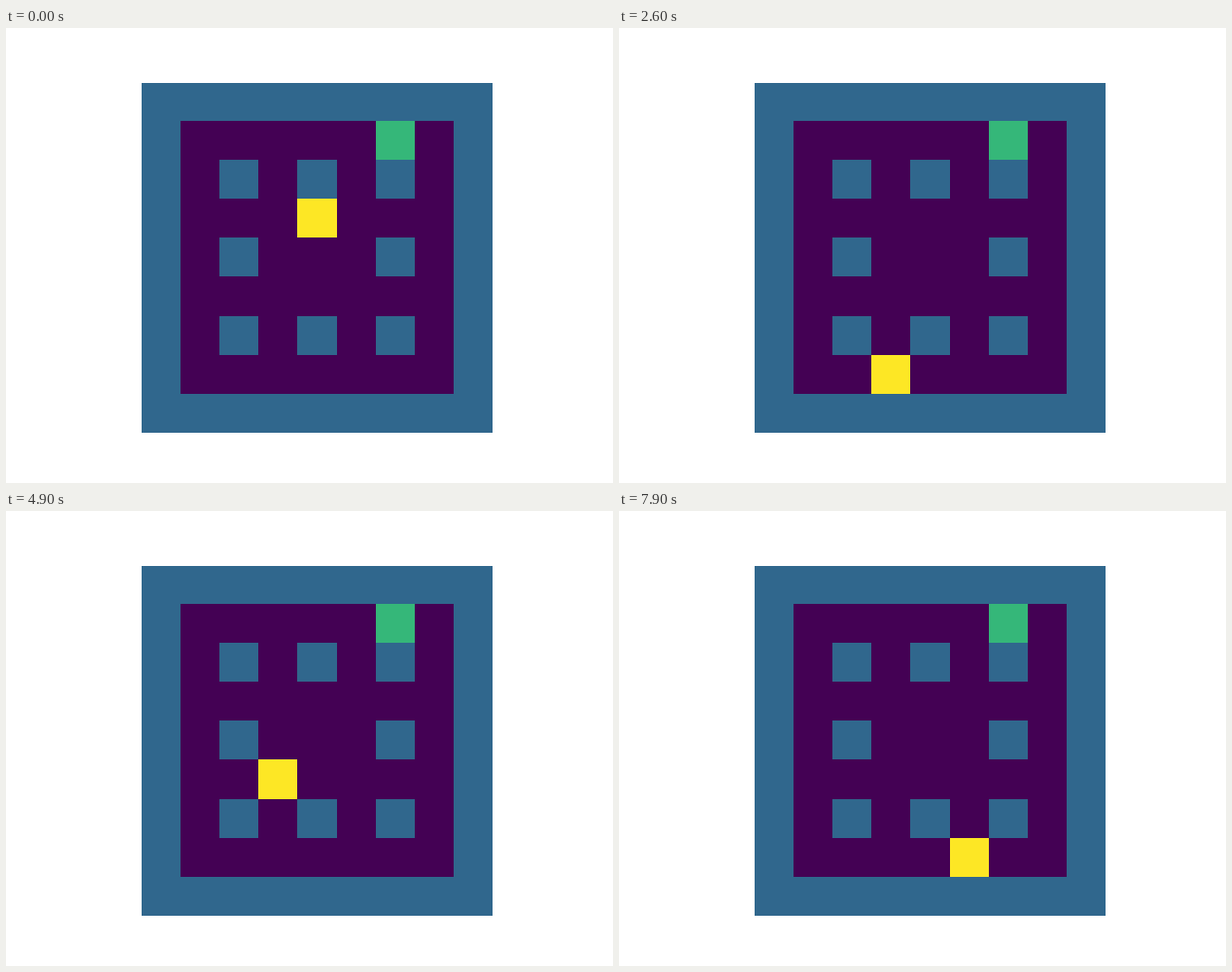
These frames come from a looping animation (640 px wide and 480 px high, 8 s). An HTML page:

```html
<!DOCTYPE html>
<html lang="en">
<head>
<meta charset="utf-8">
<title>Grid walk</title>
<style>
  html, body { margin: 0; width: 100%; height: 100%; overflow: hidden; background: #fff; }
  svg { display: block; width: 640px; height: 480px; }
</style>
</head>
<body>
<svg id="stage" viewBox="0 0 640 480" shape-rendering="crispEdges"></svg>
<script>
const STEP = 100;
const LOOP = 8000;
const WALL = '#30678d', FLOOR = '#440154', GOAL = '#35b779', AGENT = '#fde725';

// Pixel edges of the 9 columns and rows
const X = [143, 184, 225, 266, 307, 349, 390, 431, 472, 513];
const Y = [58, 98, 139, 180, 221, 262, 304, 345, 386, 427];

// One move per step; a dot means the agent stays put
const MOVES =
  '..DRDRRDDU' + 'U.LRL...LD' + '..DL..LUUU' + 'DU.RUDLRDU' +
  'L..RUDLRLD' + 'D..UD.UDUD' + 'DL.RR....L' + 'L..R..UDRR';
const DIRS = { U: [0, -1], D: [0, 1], L: [-1, 0], R: [1, 0], '.': [0, 0] };

const stage = document.getElementById('stage');

function place(rect, col, row, cols = 1, rows = 1) {
  rect.setAttribute('x', X[col]);
  rect.setAttribute('y', Y[row]);
  rect.setAttribute('width', X[col + cols] - X[col]);
  rect.setAttribute('height', Y[row + rows] - Y[row]);
}

function block(fill, ...cell) {
  const rect = document.createElementNS('http://www.w3.org/2000/svg', 'rect');
  rect.setAttribute('fill', fill);
  place(rect, ...cell);
  stage.appendChild(rect);
  return rect;
}

block(WALL, 0, 0, 9, 9);
block(FLOOR, 1, 1, 7, 7);
for (let row = 2; row < 8; row += 2) {
  for (let col = 2; col < 8; col += 2) {
    if (col !== 4 || row !== 4) block(WALL, col, row);
  }
}
block(GOAL, 6, 1);
const agent = block(AGENT, 4, 3);

let col = 4, row = 3;
const path = [...MOVES].map(move => {
  col += DIRS[move][0];
  row += DIRS[move][1];
  return [col, row];
});

function render(time) {
  place(agent, ...path[Math.floor((time % LOOP) / STEP)]);
}

let start = null;
function tick(now) {
  if (start === null) start = now;
  render(now - start);
  requestAnimationFrame(tick);
}
render(0);
requestAnimationFrame(tick);
</script>
</body>
</html>
```
